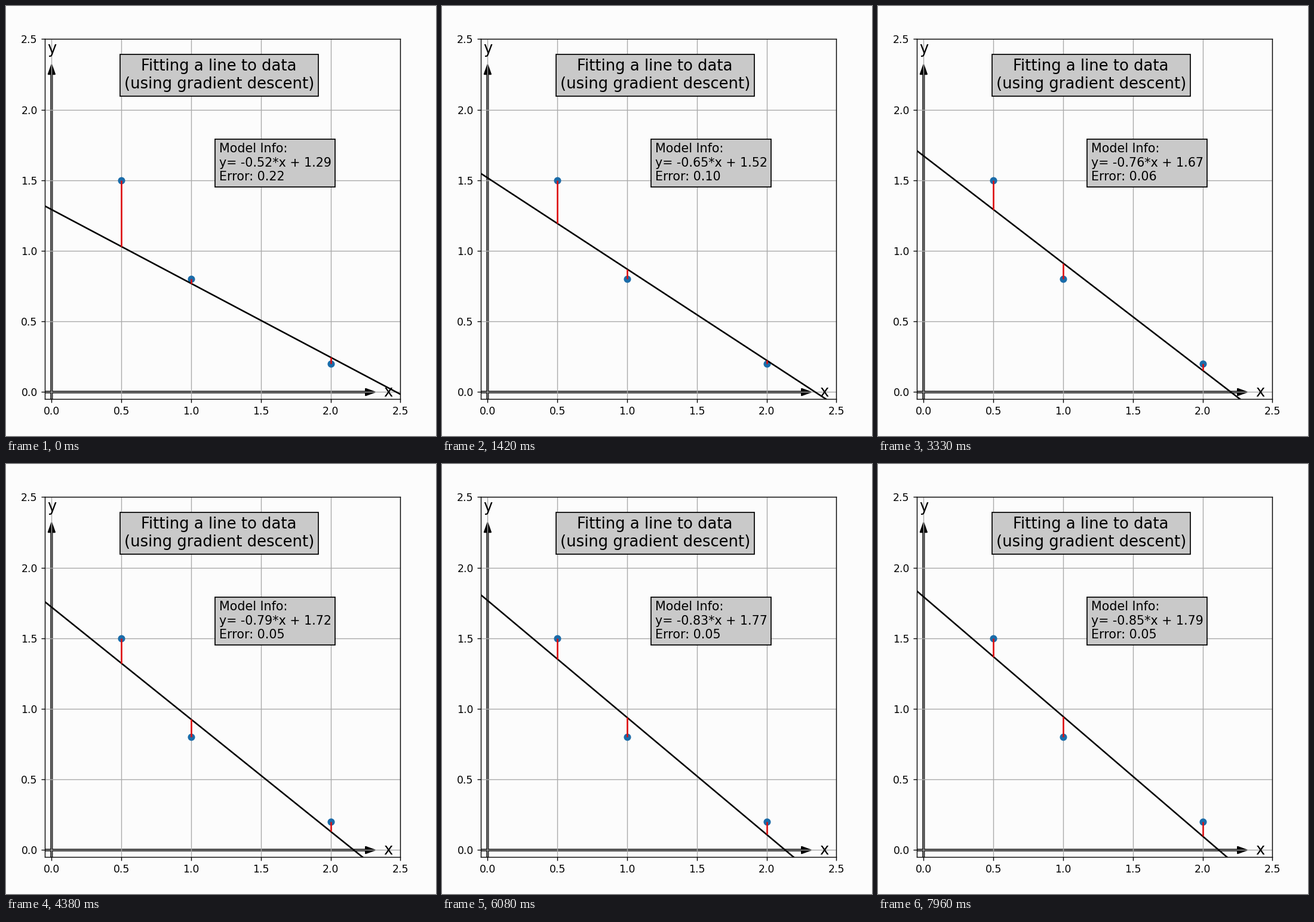
Animation of 720 by 720 pixels, one loop 8 s. Source, as a matplotlib script:

```python
import numpy as np
import matplotlib.pyplot as plt
from matplotlib.animation import FuncAnimation

SIZE, DPI = 720, 124
FRAMES, INTERVAL = 200, 40
LEFT, RIGHT, TOP, BOTTOM = 64.7, 660.3, 55.3, 658.27
LOW, HIGH = -0.05, 2.5
PAPER, PANEL, GRID = "#fcfcfc", "#c9c9c9", "#a9a9a9"
BLUE, RED = "#1b6ca9", "#df0d0f"

xs = np.array([0.5, 1.0, 2.0])
ys = np.array([1.5, 0.8, 0.2])

# Descent settles along a slow valley after a short fast transient.
SETTLED = np.array([-0.866, 1.8188])
VALLEY = np.array([1.0, -1.372])
KICK = np.array([-0.034, -0.0165])


def model(t):
    """Slope and intercept after t seconds."""
    return SETTLED + 0.376 * np.exp(-0.377 * t) * VALLEY + np.exp(-6 * t) * KICK


plt.rcParams["font.family"] = "DejaVu Sans"
inches = (SIZE + 0.01) / DPI  # guards against rounding down a pixel
fig = plt.figure(figsize=(inches, inches), dpi=DPI, facecolor=PAPER)
ax = fig.add_axes([LEFT / SIZE, 1 - BOTTOM / SIZE,
                   (RIGHT - LEFT) / SIZE, (BOTTOM - TOP) / SIZE],
                  facecolor=PAPER)
ax.set(xlim=(LOW, HIGH), ylim=(LOW, HIGH))
ticks = np.arange(0, 2.6, 0.5)
ax.set_xticks(ticks)
ax.set_yticks(ticks)
ax.grid(True, color=GRID, linewidth=0.8)

arrow = dict(width=0.01, head_width=0.05, head_length=0.07, color="black")
ax.arrow(LOW, 0, 2.3, 0, **arrow)
ax.arrow(0, LOW, 0, 2.3, **arrow)
ax.text(2.38, -0.03, "x", fontsize=15)
ax.text(-0.03, 2.4, "y", fontsize=15)

panel = dict(facecolor=PANEL, edgecolor="black")
ax.text(1.2, 2.15, "Fitting a line to data\n(using gradient descent)",
        fontsize=15, ha="center", bbox=panel)
info = ax.text(1.2, 1.5, "", fontsize=12, bbox=panel)

ax.plot(xs, ys, "o", color=BLUE, markersize=6)
line, = ax.plot([], [], color="black", linewidth=1.5)
errors = ax.vlines(xs, ys, ys, color=RED, linewidth=1.5, zorder=2.1)


def update(frame):
    m, b = model((frame + 0.5) * INTERVAL / 1000)
    fit = m * xs + b
    ends = np.array([LOW - 0.1, HIGH + 0.1])
    line.set_data(ends, m * ends + b)
    errors.set_segments([[(x, y), (x, f)] for x, y, f in zip(xs, ys, fit)])
    error = np.sum((ys - fit) ** 2)
    info.set_text(f"Model Info:\ny= {m:.2f}*x + {b:.2f}\nError: {error:.2f}")
    return line, errors, info


def reset():
    return update(0)


anim = FuncAnimation(fig, update, frames=FRAMES, init_func=reset,
                     interval=INTERVAL, repeat=True, repeat_delay=0)
plt.show()
```
